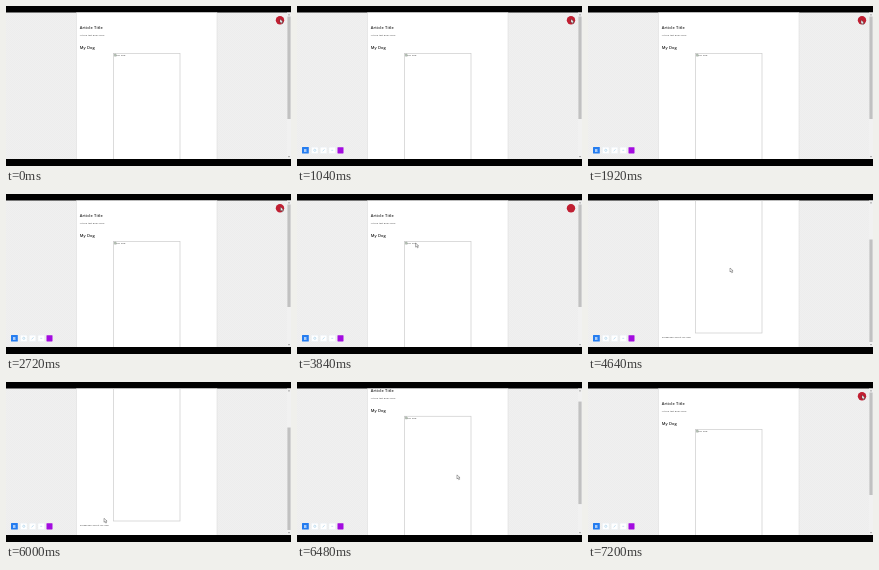
An HTML page for the animation above (8 s loop, 285 px wide and 160 px high).

```html
<!DOCTYPE html>
<html lang="en">
<head>
<meta charset="utf-8">
<title>Article page</title>
<style>
  html, body { margin: 0; width: 100%; height: 100%; overflow: hidden; background: #000; }
  svg { display: block; width: 100%; height: 100%; }
  text { font-family: "Open Sans", sans-serif; fill: #444; }
  .heading { font-size: 4px; font-weight: 600; fill: #222; letter-spacing: .1px; }
  .body { font-size: 2.5px; }
</style>
</head>
<body>
<svg viewBox="0 0 285 160">
  <defs>
    <pattern id="weave" width="4" height="4" patternUnits="userSpaceOnUse">
      <rect width="4" height="4" fill="#f0f0f0"/>
      <path d="M0 0L4 4M0 2L2 4M2 0L4 2" stroke="#ebebeb" stroke-width=".6"/>
    </pattern>
    <clipPath id="view"><rect y="6.5" width="285" height="146.5"/></clipPath>
  </defs>
  <rect width="285" height="160"/>
  <g clip-path="url(#view)">
    <rect width="285" height="160" fill="url(#weave)"/>
    <rect x="70.5" y="0" width="140.5" height="160" fill="#fff" stroke="#dedede" stroke-width=".6"/>
    <g id="page">
      <text class="heading" x="73.8" y="23.3">Article Title</text>
      <text class="body" x="73.8" y="30">Article text goes here</text>
      <text class="heading" x="73.8" y="42.8">My Dog</text>
      <rect x="107.5" y="47.5" width="66.5" height="142.5" fill="none" stroke="#ccc" stroke-width=".7"/>
      <path d="M108.4 48h1.3l.6.6v1.6h-1.9z" fill="#b9cbb9" stroke="#777" stroke-width=".3"/>
      <text class="body" x="110.5" y="50.1">My Dog</text>
      <text class="body" x="73.8" y="195.2">Paragraph about my dog</text>
      <circle cx="274" cy="14.3" r="4.2" fill="#c01f32"/>
    </g>
    <rect x="281" width="4" height="160" fill="#f1f1f1"/>
    <path d="M282 9.2l1-1.2 1 1.2zM282 150.3l1 1.2 1-1.2z" fill="#777"/>
    <rect id="thumb" x="281.4" y="10.5" width="3.2" height="102.5" fill="#c1c1c1"/>
    <g id="toolbar">
      <rect x="5" y="141" width="6.8" height="6.6" rx=".5" fill="#247cf0"/>
      <text x="8.4" y="145.7" font-size="4" font-weight="700" text-anchor="middle" style="fill:#fff">B</text>
      <g fill="#fff" stroke="#e4eef5" stroke-width=".4">
        <rect x="14.5" y="141.2" width="6.5" height="6.3" rx=".5"/>
        <rect x="23.3" y="141.2" width="6.5" height="6.3" rx=".5"/>
        <rect x="32" y="141.2" width="6.5" height="6.3" rx=".5"/>
      </g>
      <g fill="none" stroke="#9ccbe8" stroke-width=".6">
        <circle cx="17.8" cy="144.3" r="1.1"/>
        <path d="M25.6 145.4l2-2.2M34.3 144.3h1.9"/>
      </g>
      <rect x="40.5" y="141.2" width="6" height="6.2" rx=".4" fill="#a30be0"/>
    </g>
    <path id="cursor" d="M0 0v4l1-.8.8 1.6.8-.4-.8-1.6h1.3z" fill="#fff" stroke="#333" stroke-width=".4"/>
  </g>
</svg>
<script>
const LOOP = 8000, STEP = 80, SCROLL = 51, THUMB_TRAVEL = 35;
const part = id => document.getElementById(id);
const [page, thumb, toolbar, cursor] = ["page", "thumb", "toolbar", "cursor"].map(part);

// Time, x and y of each cursor stop
const stops = [
  [0, 274, 13], [1520, 274, 13], [2000, 273, 14], [2480, 274.5, 13],
  [2720, 274.5, 13], [3760, 118.5, 49], [4080, 119, 49.5], [4560, 142, 74],
  [4720, 142, 74], [5280, 98, 130], [5520, 98, 136.3], [6000, 98, 136.3],
  [7200, 274, 13], [LOOP, 274, 13]
];

function ease(t, start, end) {
  const p = Math.min(1, Math.max(0, (t - start) / (end - start)));
  return p * p * (3 - 2 * p);
}

function cursorAt(t) {
  const i = stops.findIndex(stop => stop[0] > t);
  const [t0, x0, y0] = stops[i - 1], [t1, x1, y1] = stops[i];
  const p = ease(t, t0, t1);
  return [x0 + (x1 - x0) * p, y0 + (y1 - y0) * p];
}

function draw(t) {
  const scroll = ease(t, 4080, 4560) - ease(t, 6160, 6640);
  page.setAttribute("transform", `translate(0 ${-SCROLL * scroll})`);
  thumb.setAttribute("transform", `translate(0 ${THUMB_TRAVEL * scroll})`);
  toolbar.setAttribute("opacity", ease(t, 0, 320));
  cursor.setAttribute("transform", `translate(${cursorAt(t)})`);
}

function tick() {
  const t = performance.now() % LOOP;
  draw(Math.floor(t / STEP) * STEP);
  requestAnimationFrame(tick);
}
tick();
</script>
</body>
</html>
```
